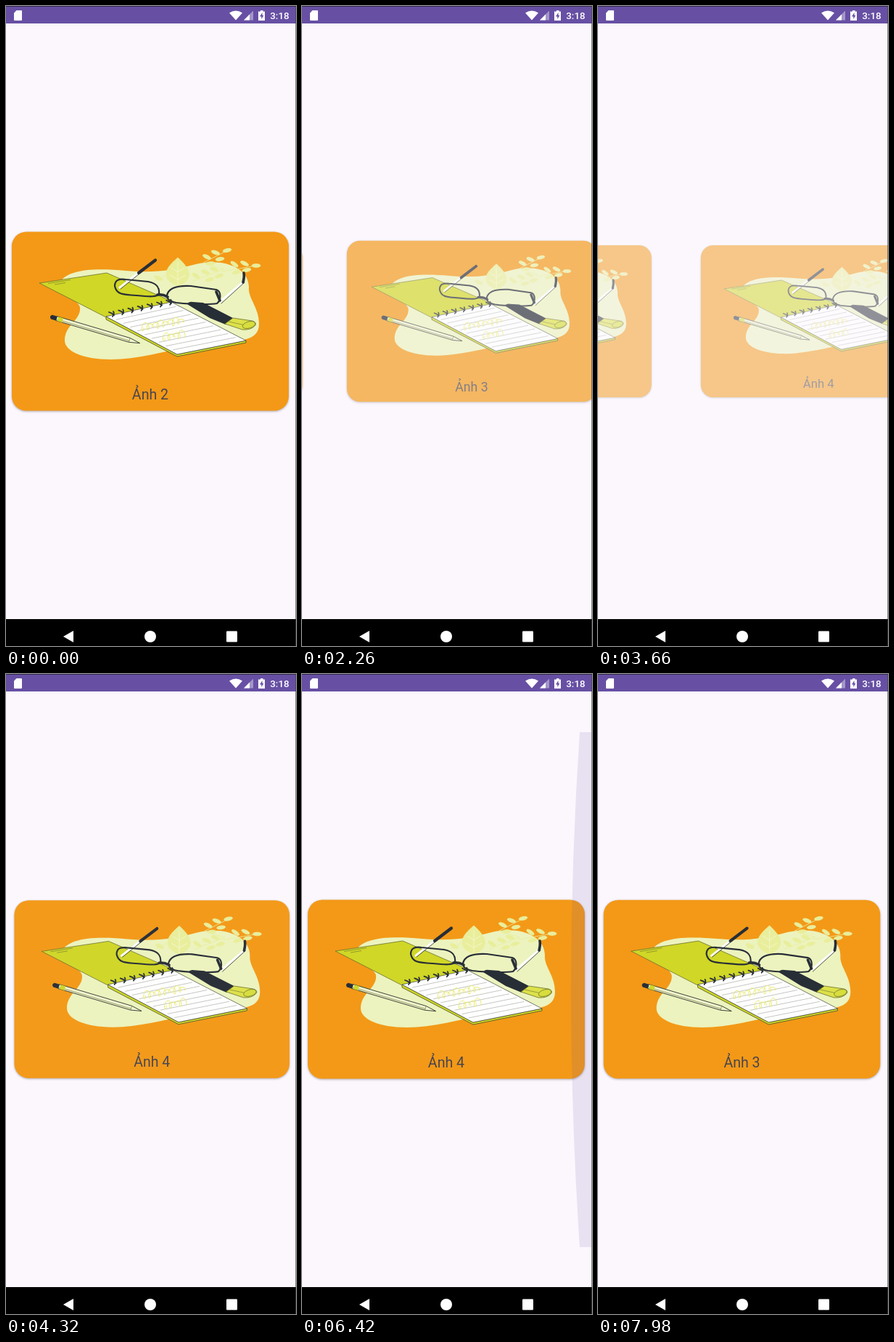
Recreate the animation shown at these times as an HTML page. Size 400 by 880 pixels, loop 8 s.

```html
<!DOCTYPE html>
<html lang="vi">
<head>
<meta charset="utf-8">
<style>
  html, body { margin: 0; width: 400px; height: 880px; overflow: hidden; background: #fbf7fd; }
  svg { display: block; font-family: Roboto, sans-serif; }
  .ink { fill: none; stroke: #282e36; stroke-linecap: round; stroke-linejoin: round; }
  .thin { fill: none; stroke: #6a7030; stroke-width: .6; }
  .plant { fill: #e9ee9c; stroke: #e9ee9c; stroke-width: .8; }
  .shadow { filter: drop-shadow(0 1px 1.5px rgba(60, 50, 60, .4)); }
</style>
</head>
<body>
<svg width="400" height="880" viewBox="0 0 400 880">
  <defs>
    <g id="card">
      <rect class="shadow" x="8" y="310.5" width="382" height="246" rx="20" fill="#f39917"/>
      <path fill="#ecf3be" d="M73 385C78 362 120 360 165 364C210 368 235 362 262 355C300 346 336 360 335 388C334 402 349 415 349 437C349 462 320 460 290 463C240 468 190 486 145 486C105 486 81 474 81 460C81 438 104 432 102 414C100 404 76 398 73 385Z"/>
      <g id="plant" class="plant">
        <path d="M237 346C247 355 254 364 252 372C250 379 243 383 237 385C229 382 221 377 221 369C221 360 229 353 237 346Z"/>
        <path d="M237 352V384M237 366l-9-6M237 366l9-6M237 376l-11-6M237 376l11-6" fill="none" stroke="#f5f8d2"/>
        <path d="M205 378L220 370M258 378L300 362L272 353L304 337M298 365L345 357" fill="none"/>
      </g>
      <path d="M46 381L139 367L231 407L138 428Z" fill="#d0d726" stroke="#6a7030" stroke-width=".8"/>
      <path class="thin" d="M58 381.5L89 376.5M67 383L82 380.5"/>
      <path d="M138 427V431L236 482L331 463V460L236 479Z" fill="#d0d726" stroke="#4a5028" stroke-width=".8"/>
      <path d="M138 427L228 407L331 460L236 479Z" fill="#fff" stroke="#3c4234" stroke-width=".7"/>
      <path id="rules" fill="none" stroke="#8a8f82" stroke-width=".5"/>
      <path id="writing" fill="none" stroke="#e9ea70" stroke-width="1"/>
      <path id="spiral" class="ink" stroke-width="1.800"/>
      <path d="M250 410Q252 406 258 407L272 408L313 429L303 438L281 429Z" fill="#282e36"/>
      <path d="M313 429L340 433Q346 435 344 439Q338 446 326 445L302 437Z" fill="#dde149" stroke="#6a7030" stroke-width=".8"/>
      <path class="thin" d="M307 434L330 439"/>
      <ellipse cx="335" cy="438.500" rx="9" ry="4.500" transform="rotate(-16 335 438.500)" fill="#d8de3c" stroke="#6a7030" stroke-width=".7"/>
      <g transform="translate(61 427) rotate(16.500)">
        <path d="M9-3H114L129 0L114 3H9Z" fill="#f1f5cf" stroke="#3c4234" stroke-width=".9"/>
        <path class="thin" d="M9 1H114M114-3V3"/>
        <path d="M9-3H2Q-2 0 2 3H9Z" fill="#282e36"/>
        <path d="M11-3H18V3H11Z" fill="#d0d726"/>
      </g>
      <path d="M156 388L182 367.500M295 407L328 379" stroke="#fff" stroke-width="3"/>
      <g class="ink">
        <path stroke-width=".8" d="M158 389L183 369M297 409L329 380"/>
        <path stroke-width="4.200" d="M183 367L206 349.500"/>
        <path stroke-width="3.600" d="M328 367Q329 372 327 380"/>
        <path stroke-width="2.200" d="M150 385C150 376 157 375 165 376L196 379C208 381 212 388 211 396C208 400 200 400 180 398C160 397 152 396 150 385ZM222 398C224 387 236 384 255 385L290 390C297 392 297 404 291 409C280 411 250 410 235 408C225 406 222 403 222 398Z"/>
        <path stroke-width="3.600" d="M209 397Q216 396 223 400M290 393L295 405"/>
      </g>
    </g>
  </defs>

  <g id="pages"></g>
  <path id="glow" fill="rgba(103, 80, 164, .13)"/>

  <rect width="400" height="24" fill="#6750a4"/>
  <rect width="400" height="1" fill="#332a4c"/>
  <g fill="#fff">
    <path d="M14.500 6H21Q22 6 22 7V19Q22 20 21 20H12Q11 20 11 19V9.500Z"/>
    <path d="M308 9.500Q317 3.500 326 9.500L317 19.500Z"/>
    <path d="M328 19.500L341 6.500V19.500Z" opacity=".4"/>
    <path d="M328 19.500L336 11.500V19.500Z"/>
    <path d="M351 6H354.500V7.500H357V20H348V7.500H351Z"/>
    <path d="M353.500 9L350 14.500H352.300V18L355.500 12.800H353.500Z" fill="#6750a4"/>
    <text x="377.500" y="18" font-size="13.500" font-weight="500" text-anchor="middle">3:18</text>
  </g>
  <rect y="843" width="400" height="37"/>
  <g fill="#fff">
    <path d="M79 867L93 859V875Z"/>
    <circle cx="199" cy="867" r="8"/>
    <rect x="304" y="859.500" width="15" height="15" rx="1"/>
  </g>
  <rect x="399" width="1" height="880" fill="#444" opacity=".6"/>
</svg>
<script>
const LOOP = 8000, FIRST_PAGE = 2;
const $ = id => document.getElementById(id);
const mix = (a, b, u) => a + (b - a) * u;

// Notebook details
let rules = '', spiral = '';
for (let i = 1; i < 10; i++) {
  const u = i / 10;
  rules += `M${mix(138, 236, u) + 4} ${mix(427, 479, u) - 1}L${mix(228, 331, u) - 4} ${mix(407, 460, u) + 1}`;
}
for (let i = 0; i < 7; i++) spiral += `M${142 + i * 13.2} ${421 - i * 2.7}q4 1 7 4m-1-5q2 3-1 7`;
$('rules').setAttribute('d', rules);
$('spiral').setAttribute('d', spiral);

function scribble(x, y, width) {
  let d = '';
  for (let s = 0; s <= width; s += .7) {
    const px = x + s + 3 * Math.cos(s * .9), py = y - s * .17 + (4 + 2 * Math.sin(s * .31)) * Math.sin(s * .9);
    d += `${s ? 'L' : 'M'}${px.toFixed(1)} ${py.toFixed(1)}`;
  }
  return d;
}
$('writing').setAttribute('d', scribble(187, 442, 59) + scribble(216, 456, 30));

// Twig leaves: x, y, angle
const leaves = [[277, 345, 25], [289, 339, 20], [282, 354, -5], [295, 348, -8], [305, 336, -12],
  [315, 355, 35], [329, 354, 25], [318, 366, -15], [332, 363, -10], [345, 357, 0],
  [275, 366, 20], [287, 362, 20], [281, 376, -15], [294, 371, -15], [210, 374, 25], [262, 371, 35]];
$('plant').insertAdjacentHTML('beforeend', leaves.map(([x, y, a]) =>
  `<ellipse cx="${x}" cy="${y}" rx="6" ry="2.400" transform="rotate(${a} ${x} ${y})"/>`).join(''));

const numbers = [1, 2, 3, 4];
$('pages').innerHTML = numbers.map(n => `<g><use href="#card"/>
  <text x="199" y="541" font-size="19.600" text-anchor="middle" fill="#49454f">Ảnh ${n}</text></g>`).join('');
const pages = [...$('pages').children];

// Each swipe is a drag to halfway, then a quintic settle
const swipes = [
  { start: 1800, release: 2040, end: 2840, from: 2, to: 3, grab: .08 },
  { start: 3220, release: 3509, end: 4905, from: 3, to: 4, grab: .03 },
  { start: 6640, release: 6977, end: 8413, from: 4, to: 3, grab: .03 },
];

function scrollAt(t) {
  let page = FIRST_PAGE;
  for (const { start, release, end, from, to, grab } of swipes) {
    if (t < start) break;
    const u = t < release
      ? mix(grab, .5, (t - start) / (release - start))
      : 1 - .5 * Math.max(0, (end - t) / (end - release)) ** 5;
    page = mix(from, to, u);
  }
  return page;
}

// Overscroll depth: time, pixels
const pull = [[4900, 0], [5250, 45], [5650, 70], [6000, 66], [6420, 28], [6680, 0]];
function glowAt(t) {
  const i = pull.findIndex(p => p[0] > t);
  if (i < 1) return 0;
  const [t0, d0] = pull[i - 1], [t1, d1] = pull[i];
  return mix(d0, d1, (t - t0) / (t1 - t0));
}

function draw(now) {
  const t = now % LOOP, scroll = scrollAt(t);
  pages.forEach((page, i) => {
    const pos = numbers[i] - scroll;
    const scale = Math.max(.85, 1 - Math.abs(pos));
    const x = 199 + 400 * pos - (pos > 0 ? 48 * (1 - scale) : 0);
    page.setAttribute('transform', `translate(${x} 433.5) scale(${scale}) translate(-199 -433.5)`);
    page.setAttribute('opacity', .5 + (scale - .85) / .3);
    page.style.display = Math.abs(pos) < 1 ? '' : 'none';
  });
  const depth = glowAt(t), edge = 399 - .57 * depth;
  $('glow').setAttribute('d', depth ? `M399 80H${edge}Q${399 - 1.43 * depth} 434 ${edge} 788H399Z` : '');
  requestAnimationFrame(() => draw(performance.now() - began));
}
const began = performance.now();
draw(0);
</script>
</body>
</html>
```
